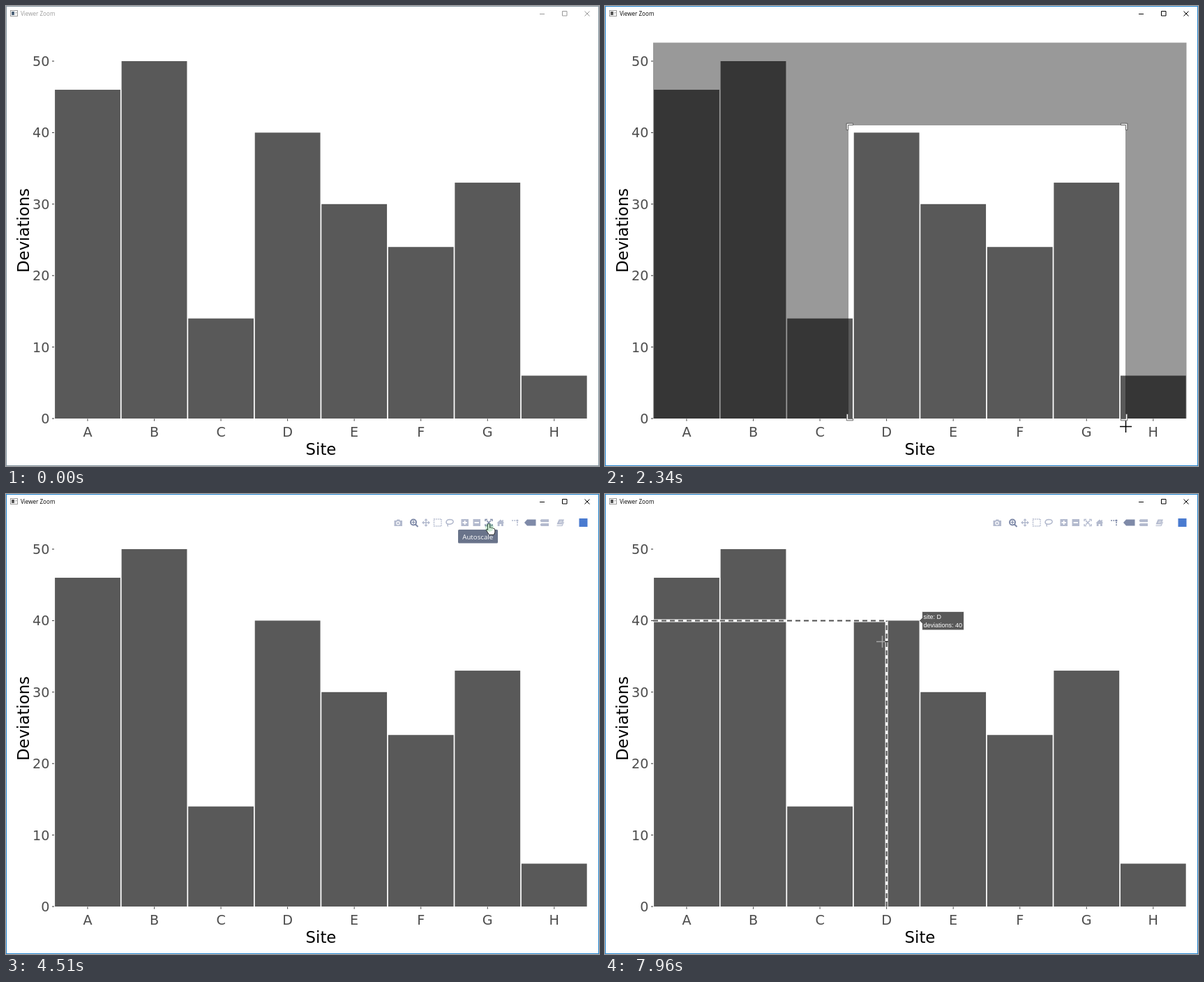
Recreate the animation shown at these times as an HTML page. Size 850 by 659 pixels, loop 8000 ms.

```html
<!DOCTYPE html>
<html>
<head>
<meta charset="utf-8">
<style>
html, body { margin: 0; width: 100%; height: 100%; overflow: hidden; background: #fff; }
svg { display: block; }
.axis { font-family: "DejaVu Sans", sans-serif; }
.ui { font-family: "Open Sans", sans-serif; }
.label { font-family: "Liberation Sans", sans-serif; font-size: 9px; fill: #fff; }
</style>
</head>
<body>
<svg id="stage" width="850" height="659" viewBox="0 0 850 659"></svg>
<script>
const stage = document.getElementById('stage');
const LOOP = 8000, BASE = 591, LEFT = 69, RIGHT = 833.5, TOP = 52.5;
const SEL = { x: 349, y: 171 };
const PRESS = 920, DRAG = 1140, RELEASE = 2340, ZOOM = 2410, RESET = 4510;
const LIGHT = '#b3bace', DARK = '#7f8aa8';
const values = [46, 50, 14, 40, 30, 24, 33, 6];

// time, x, y of the pointer
const path = [
  [70, 850, 110], [800, SEL.x, SEL.y], [DRAG, SEL.x, SEL.y], [1370, 699, 619],
  [2170, 746, 602], [2500, 746, 602], [3380, 716, 112], [3590, 694, 35],
  [3720, 694, 35], [4200, 692, 42], [4980, 692, 42], [5940, 725, 44],
  [7030, 725, 44], [7900, 397, 211], [LOOP, 397, 211]
];

const clamp = (v, a, b) => Math.max(a, Math.min(b, v));
const fade = (t, start, ms) => clamp((t - start) / ms, 0, 1);

function pointer(t) {
  const i = path.findIndex(k => k[0] > t);
  if (i < 1) return { x: -50, y: -50 };
  const [t0, x0, y0] = path[i - 1], [t1, x1, y1] = path[i];
  let p = (t - t0) / (t1 - t0);
  p = p * p * (3 - 2 * p);
  return { x: x0 + (x1 - x0) * p, y: y0 + (y1 - y0) * p };
}

const rect = (x, y, w, h, fill, more = '') =>
  `<rect x="${x}" y="${y}" width="${w}" height="${h}" fill="${fill}" ${more}/>`;
const fillPath = (d, fill, more = '') => `<path d="${d}" fill="${fill}" ${more}/>`;
const line = (d, color, width = 1, more = '') =>
  `<path d="${d}" fill="none" stroke="${color}" stroke-width="${width}" ${more}/>`;
const text = (x, y, size, str, fill, anchor = 'start', more = '') =>
  `<text x="${x}" y="${y}" font-size="${size}" fill="${fill}" text-anchor="${anchor}" ${more}>${str}</text>`;

function frameBar(active) {
  const ink = active ? '#000' : '#999', edge = active ? '#2485d0' : '#84959f';
  return rect(.5, .5, 849, 658, 'none', `stroke="${edge}"`) +
    rect(6.5, 6.5, 10, 8, '#fff', 'stroke="#9a9a9a"') +
    rect(8, 8, 4, 5, active ? '#555' : '#4b6177') +
    line('M13.5 9.5h2M13.5 11.5h1', '#999') +
    `<g class="ui">${text(21, 14, 8.1, 'Viewer Zoom', ink)}</g>` +
    line('M765 11.5h7M797.5 7.5h6.5v6.5h-6.5zM829.5 7.5l7 7M836.5 7.5l-7 7', ink);
}

function view(t) {
  return t >= ZOOM && t < RESET
    ? { step: 183.8, first: -377.8, unit: 13.135, bar: 180.3, max: 40, right: 839 }
    : { step: 95.54, first: 117, unit: 10.24, bar: 93.8, max: 50, right: RIGHT };
}

function chart(v) {
  let bars = '', ticks = '', labels = '';
  values.forEach((n, i) => {
    const x = v.first + i * v.step, a = Math.max(LEFT, x - v.bar / 2),
      b = Math.min(v.right, x + v.bar / 2), top = BASE - n * v.unit;
    if (b > a) bars += rect(a, top, b - a, BASE - top, '#595959');
    if (x > LEFT && x < v.right) {
      ticks += `M${x} 591.5v3`;
      labels += text(x, 617, 19.2, 'ABCDEFGH'[i], '#4d4d4d', 'middle');
    }
  });
  for (let n = 0; n <= v.max; n += 10) {
    const y = BASE - n * v.unit;
    ticks += `M66 ${y}h3`;
    labels += text(62.5, y + 7, 19.2, n, '#4d4d4d', 'end');
  }
  return bars + line(ticks, '#333') + `<g class="axis">${labels}` +
    text(451.5, 643, 22.8, 'Site', '#000', 'middle') +
    text(0, 0, 22.8, 'Deviations', '#000', 'middle', 'transform="translate(33 321.5) rotate(-90)"') + '</g>';
}

function selection(p) {
  const x = Math.max(p.x, SEL.x + 1), y = clamp(p.y, SEL.y + 1, BASE);
  const corner = (cx, cy, sx, sy) => fillPath('M-2.8 6.6h2.4v-7h7v-2.4h-9.4z', '#fff',
    `stroke="#444" stroke-width=".8" transform="translate(${cx} ${cy}) scale(${sx} ${sy})"`);
  return fillPath(`M${LEFT} ${TOP}H${RIGHT}V${BASE}H${LEFT}zM${SEL.x} ${SEL.y}V${y}H${x}V${SEL.y}z`,
    '#000', 'fill-opacity=".4" fill-rule="evenodd"') +
    corner(SEL.x, SEL.y, 1, 1) + corner(x, SEL.y, -1, 1) +
    corner(SEL.x, y, 1, -1) + corner(x, y, -1, -1);
}

function toolbar(opacity, onScale, spike) {
  const scale = onScale ? DARK : LIGHT;
  return `<g opacity="${opacity}">` +
    fillPath('M556.5 38h3l1-1.5h3.500l1 1.5h3v8h-11.500z', LIGHT) +
    '<circle cx="562" cy="41.800" r="2.200" fill="' + LIGHT + '" stroke="#fff" stroke-width="1.200"/>' +
    line('M580 40.500a4 4 0 1 0 8 0a4 4 0 1 0 -8 0M587 43.500l3.500 3.500', DARK, 2) +
    line('M581.500 40.500h5M584 38v5', DARK, 1.2) +
    line('M598 41h8M602 37v8', LIGHT, 1.3) +
    fillPath('M596 41l3-2.500v5zM608 41l-3-2.500v5zM602 35l-2.500 3h5zM602 47l-2.500-3h5z', LIGHT) +
    rect(613.5, 36, 10.5, 10, 'none', `stroke="${LIGHT}" stroke-width="1.5" stroke-dasharray="1.6 1.1"`) +
    line('M633 43c-3-1-3-6 3-6.500c6 0 7 5 1.500 6.500c-2 .5-3 .2-4 0c-1.500 1 .5 2-.5 3.500', LIGHT, 1.5) +
    rect(652.5, 36, 10.5, 10, LIGHT) + line('M654.500 41h6.500M657.700 38v6', '#fff', 1.8) +
    rect(669.5, 36, 10.5, 10, LIGHT) + line('M671.500 41h6.500', '#fff', 1.8) +
    line('M687 39v-2.500h3M694 36.500h3v2.500M697 43v2.500h-3M690 45.500h-3v-2.500', scale, 1.4) +
    line('M689 38l6 6M695 38l-6 6', scale, 1.5) +
    fillPath('M703.500 41.500l5.300-5l2.500 2.200v-1.700h1.500v3l1.500 1.500h-1.500v4.500h-2.800v-3h-2.500v3h-2.800v-4.500z', LIGHT) +
    line('M725 38h8', spike, 1.6, 'stroke-dasharray="2 1.2"') +
    line('M733 40v6', spike, 1.6, 'stroke-dasharray="2 1.2"') +
    '<circle cx="733" cy="38" r="1.500" fill="' + spike + '"/>' +
    fillPath('M743 41l4-4.500h12.500v9h-12.500z', DARK) +
    fillPath('M765.500 38.200l1.500-2h11v4h-11zM765.500 44l1.500-2h11v4h-11z', LIGHT) +
    fillPath('M792.500 36.500h7.500l-3 7h-7.500z', LIGHT) +
    line('M789.500 45.500h7.500l2.500-5.500', LIGHT, 1.2) +
    line('M793.500 39h4M792.700 41h4', '#fff', .7) +
    rect(821.5, 35, 12, 12, '#4a7bd0') + '</g>';
}

const tooltip = (right, w, str) => rect(right - w, 51, w, 19.5, '#69738a', 'rx="1.5"') +
  `<g class="ui">${text(right - w + 6.3, 64.5, 9.7, str, '#fff')}</g>`;

function hover(v, p, spikes) {
  const i = values.findIndex((n, k) => Math.abs(p.x - v.first - k * v.step) < v.bar / 2 &&
    p.y > BASE - n * v.unit && p.y < BASE);
  if (i < 0) return '';
  const x = v.first + i * v.step, y = BASE - values[i] * v.unit;
  const side = x + v.bar / 2 + 65 > 850 ? -1 : 1, tip = x + side * v.bar / 2;
  const left = side > 0 ? tip + 4 : tip - 64;
  const d = `M${LEFT} ${y}H${x}M${x} ${BASE}V${y}`;
  return (spikes ? line(d, '#fff', 4) + line(d, '#505050', 2, 'stroke-dasharray="7 5"') : '') +
    fillPath(`M${tip} ${y}l${4 * side} -4v-9h${60 * side}v26.500h${-60 * side}v-9.500z`,
      '#595959', 'stroke="#fff" stroke-width=".8"') +
    `<g class="label"><text x="${left + 2}" y="${y - 2.4}">site: ${'ABCDEFGH'[i]}</text>` +
    `<text x="${left + 2}" y="${y + 9.6}">deviations: ${values[i]}</text></g>`;
}

function cursor(t, p, hand) {
  const x = Math.round(p.x), y = Math.round(p.y);
  if (hand) {
    const click = (t >= RESET && t < 4980) || (t >= 6400 && t < 6560);
    return fillPath('M-1.500 1.500q1.500-2 3 0v5l1-.7q1.300-.2 1.700 1q1.500-.8 2.300.6q2-.4 2.300 1.600v3.500l-1.500 4h-6.800l-4-6.500q-.5-2 1.500-1.300l.5.800z',
      '#fff', `stroke="#222" stroke-width=".9" stroke-linejoin="round" transform="translate(${x} ${y})"`) +
      (click ? `<circle cx="${x + 1}" cy="${y + 6}" r="6" fill="#3fae5a" opacity=".25"/>` : '');
  }
  const down = t >= PRESS && t < RELEASE;
  return line(`M${x - 8} ${y + .5}h17M${x + .5} ${y - 8}v17`, '#fff', 1.5, 'style="mix-blend-mode:difference"') +
    (down ? `<circle cx="${x}" cy="${y}" r="9" fill="#ff6" style="mix-blend-mode:multiply"/>` : '');
}

function scene(t) {
  const v = view(t), p = pointer(t), dragging = t >= DRAG && t < ZOOM;
  const hand = t > 3400 && p.y < TOP && p.x > 680;
  const onScale = hand && p.x < 700 && p.y < 50, onSpike = hand && p.x > 717;
  const opacity = t < DRAG ? fade(t, 150, 300) : t < ZOOM ? 1 - fade(t, DRAG, 200) : fade(t, 3250, 300);
  return rect(0, 0, 850, 659, '#fff') + chart(v) +
    (dragging ? selection(p) : hover(v, p, t > 6400)) +
    toolbar(opacity, onScale, onSpike || t > 6400 ? DARK : LIGHT) +
    (onScale ? tooltip(705, 57, 'Autoscale') : '') +
    (onSpike ? tooltip(744, 96, 'Toggle Spike Lines') : '') +
    frameBar(t >= PRESS) + cursor(t, p, hand);
}

const start = performance.now();
function draw() {
  stage.innerHTML = scene((performance.now() - start) % LOOP);
  requestAnimationFrame(draw);
}
draw();
</script>
</body>
</html>
```
